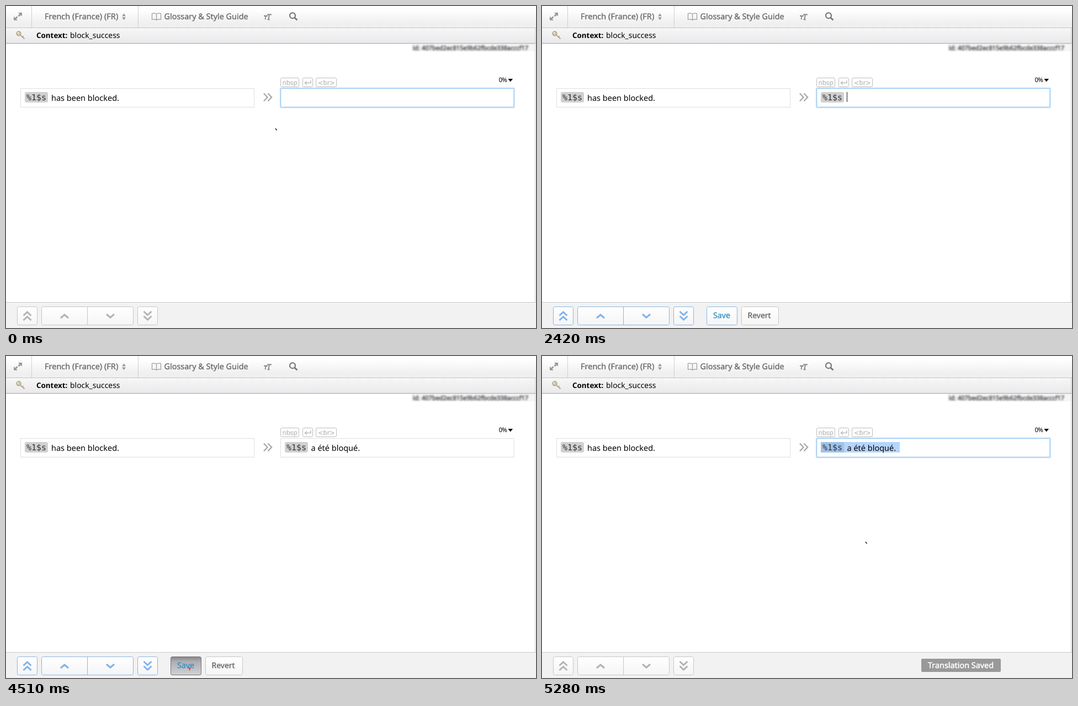
Animation of 960x584 px, one loop 5.5 s. Source, as an HTML page:

```html
<!DOCTYPE html>
<html lang="en">
<head>
<meta charset="utf-8">
<title>Translation editor</title>
<style>
html, body { margin: 0; width: 100%; height: 100%; overflow: hidden; background: #fff; }
svg { display: block; width: 960px; height: 584px; font: 14.5px "Noto Sans", "Open Sans", sans-serif; text-rendering: geometricPrecision; }
/* One tick of 110 ms is 2 % of the loop. */
svg * { animation: none 5.5s step-end infinite; }
.line { fill: none; stroke: #9b9b9b; stroke-width: 2; }
.medium { fill: #666; stroke: #666; stroke-width: .3; }
.mono { font: 15px "DejaVu Sans Mono", monospace; fill: #333; }
.tool { font: 11.3px "DejaVu Sans", sans-serif; fill: #b9b9b9; stroke: #b9b9b9; stroke-width: .25; }
.field { fill: #fff; stroke: #dedede; }
.hash { font-size: 11px; fill: #555; stroke: #555; stroke-width: .6; filter: blur(1.8px); }

.buttons { fill: url(#button); stroke: #c6c6c6; animation-name: borders; }
.chevrons { fill: none; stroke: #b2b2b2; stroke-width: 3; animation-name: chevrons; }
@keyframes borders { 10% { stroke: #8bb5e2; } 90% { stroke: #c6c6c6; } }
@keyframes chevrons { 10% { stroke: #7fb2ec; } 90% { stroke: #b2b2b2; } }

.actions, .chip, .toast, .selection, .pressed, .flash, .click, .beam, .caret { opacity: 0; }
.actions { animation-name: actions; }
.chip { animation-name: chip; }
.toast, .selection { animation-name: saved; }
.pressed { animation-name: pressed; }
.flash { animation-name: flash; }
.focus { animation-name: focus; }
@keyframes actions { 10% { opacity: 1; } 90% { opacity: 0; } }
@keyframes chip { 10% { opacity: 1; } }
@keyframes saved { 90% { opacity: 1; } }
@keyframes pressed { 82% { opacity: 1; } 90% { opacity: 0; } }
@keyframes flash { 84% { opacity: 1; } 88% { opacity: 0; } }
@keyframes focus { 82% { opacity: 0; } 90% { opacity: 1; } }

.typed tspan { fill-opacity: 0; }
.typed tspan:nth-child(1) { animation-name: type1; }
.typed tspan:nth-child(2) { animation-name: type2; }
.typed tspan:nth-child(3) { animation-name: type3; }
@keyframes type1 { 46% { fill-opacity: 1; } }
@keyframes type2 { 48% { fill-opacity: 1; } }
@keyframes type3 { 60% { fill-opacity: 1; } }

.caret { animation-name: blink, advance; }
@keyframes blink {
  34%, 42%, 56%, 64%, 72%, 80% { opacity: 1; }
  38%, 52%, 60%, 68%, 76%, 82% { opacity: 0; }
}
@keyframes advance {
  0% { transform: translateX(552.5px); }
  46% { transform: translateX(587.5px); }
  48% { transform: translateX(637.5px); }
  60% { transform: translateX(645.5px); }
}

.pointer { animation-name: travel; }
.arrow { animation-name: arrow; }
.click { animation-name: click; }
.beam { animation-name: beam; }
@keyframes travel {
  0% { transform: translate(489px, 223px); animation-timing-function: steps(5); }
  10% { transform: translate(53px, 160px); }
  12% { transform: translate(53px, 160px); animation-timing-function: steps(4); }
  20% { transform: translate(519px, 160px); }
  64% { transform: translate(520px, 200px); animation-timing-function: steps(2); }
  68% { transform: translate(335px, 562px); }
  76% { transform: translate(332px, 567px); }
  88% { transform: translate(332px, 567px); animation-timing-function: steps(4); }
  96%, 100% { transform: translate(587px, 338px); }
}
@keyframes arrow { 0%, 14%, 66%, 88% { opacity: 1; } 10%, 20%, 82% { opacity: 0; } }
@keyframes click { 10%, 82% { opacity: 1; } 14%, 88% { opacity: 0; } }
@keyframes beam { 20% { opacity: .7; } 26% { opacity: 0; } }
</style>
</head>
<body>
<svg viewBox="0 0 960 584">
  <defs>
    <linearGradient id="header" x2="0" y2="1"><stop offset=".2" stop-color="#fefefe"/><stop offset=".75" stop-color="#f0f0f0"/><stop offset="1" stop-color="#efefef"/></linearGradient>
    <linearGradient id="context" x2="0" y2="1"><stop stop-color="#f7f7f8"/><stop offset="1" stop-color="#e9e9eb"/></linearGradient>
    <linearGradient id="button" x2="0" y2="1"><stop stop-color="#fff"/><stop offset="1" stop-color="#f5f5f5"/></linearGradient>
    <linearGradient id="press" x2="0" y2="1"><stop stop-color="#858589"/><stop offset=".25" stop-color="#adadb1"/><stop offset="1" stop-color="#d2d2d5"/></linearGradient>
    <g id="tag">
      <rect y="156" width="42" height="19" rx="3" fill="#d0d0d0"/>
      <text class="mono" x="3" y="171">%1$s</text>
    </g>
  </defs>
  <rect width="960" height="584" fill="#fff"/>

  <!-- header -->
  <rect width="960" height="40" fill="url(#header)"/>
  <path d="M46.5 0V39M239.5 0V39" stroke="#cfcfcf"/>
  <path d="M0 39.5H960" stroke="#c4c4c4"/>
  <g fill="#999">
    <path d="M22 12h7v7l-2.500-2.500-3 3-2-2 3-3zM14 19v7h7l-2.500-2.500 3-3-2-2-3 3z"/>
    <path d="M210 18.500l3.500-5 3.500 5zM210 20.500l3.500 5 3.500-5z"/>
  </g>
  <path class="line" style="stroke-width:1.200" d="M272.500 14.500C270 12.500 267 13 264.500 13.500V24.500C267 24 270 24 272.500 25.500 275 24 278 24 280.500 24.500V13.500C278 13 275 12.500 272.500 14.500V25.500"/>
  <g class="medium">
    <text x="70" y="24">French (France) (FR)</text>
    <text x="286.500" y="24" font-size="14.400">Glossary &amp; Style Guide</text>
  </g>
  <g fill="none" stroke="#888" stroke-width="1.800">
    <path d="M467 18H474M470.500 18L469.500 24.500M473 15.500H481M477 15.500L475.500 24.500M473.500 24.500H477.500"/>
    <path d="M522.500 21L527.500 25.500" stroke="#777" stroke-width="3"/>
    <circle cx="519" cy="17.300" r="5" stroke="#777" stroke-width="2.200"/>
  </g>

  <!-- context bar -->
  <rect y="40" width="960" height="27" fill="url(#context)"/>
  <path d="M0 67.500H960" stroke="#bdbdbd"/>
  <path d="M0 68.500H960" stroke="#d6d6d6"/>
  <path d="M958.500 40V537" stroke="#cfcfcf"/>
  <g fill="none" stroke="#b3aa8d">
    <path d="M26 53L33.500 59.500M29.500 56.500L31.500 54.500" stroke-width="2"/>
    <circle cx="23" cy="50" r="3.700" fill="#d8d0b2" stroke-width="2"/>
    <circle cx="21.500" cy="48.500" r="1" fill="#fff" stroke="none"/>
  </g>
  <text x="55" y="58" font-size="13.400" font-weight="700">Context:</text>
  <text x="116" y="58" font-size="13.900">block_success</text>
  <rect x="735" y="69" width="223" height="13" fill="#f5f5f5"/>
  <g class="hash"><text x="737" y="80">id:</text><text x="753" y="80">407bed2ec815e9b62fbcde338acccf17</text></g>

  <!-- editor -->
  <g fill="none" stroke="#bcbcbc">
    <rect x="497.500" y="130.500" width="33" height="16" rx="2"/>
    <rect x="537.500" y="130.500" width="18" height="16" rx="2"/>
    <rect x="561.500" y="130.500" width="37" height="16" rx="2"/>
    <path d="M552 135V139.500H542M545 136.500L541.500 139.500 545 142.500" stroke-width="1.500"/>
  </g>
  <g class="tool"><text x="500.500" y="143">nbsp</text><text x="565" y="143">&lt;br&gt;</text></g>
  <text x="892.500" y="138" font-size="11.500" letter-spacing="-.9">0%</text>
  <path d="M909.500 132H918L913.700 137.500z"/>

  <rect class="field" x="26.500" y="149.500" width="423" height="34"/>
  <use href="#tag" x="34"/>
  <text x="82" y="172">has been blocked.</text>
  <path class="line" style="stroke:#aaa;stroke-width:2.400" d="M467 158.500L473.500 165.500 467 172.500M474.500 158.500L481 165.500 474.500 172.500"/>

  <rect class="field" x="497.500" y="149.500" width="422.500" height="34"/>
  <path class="flash" d="M505 177H911V198.500H531V194H505z" fill="#fff9f1"/>
  <g class="focus" fill="none">
    <rect x="497" y="149" width="423.500" height="35" rx="1.500" stroke="#d5e9fb" stroke-width="3"/>
    <rect x="497.500" y="149.500" width="422.500" height="34" rx="1" stroke="#93c5ef"/>
  </g>
  <g class="chip"><use href="#tag" x="505"/></g>
  <g class="selection">
    <rect x="505" y="156" width="42" height="19" fill="#9fc1ea"/>
    <rect x="547" y="156" width="101" height="19" fill="#b5d5fd"/>
    <text class="mono" x="508" y="171">%1$s</text>
  </g>
  <text class="typed" x="552.500" y="172"><tspan>a été</tspan><tspan> bloqué</tspan><tspan>.</tspan></text>
  <path class="caret" d="M0 156V174" stroke="#222" stroke-width="1.200"/>

  <!-- footer -->
  <rect y="537" width="960" height="47" fill="#f2f2f2"/>
  <path d="M0 537.500H960" stroke="#c9c9c9"/>
  <g class="buttons">
    <rect x="20.500" y="545.500" width="36" height="33" rx="3"/>
    <rect x="64.500" y="545.500" width="166" height="33" rx="3"/>
    <path d="M147.500 546V578"/>
    <rect x="238.500" y="545.500" width="36" height="33" rx="3"/>
  </g>
  <path class="chevrons" d="M31.500 561.500L38.500 555 45.500 561.500M31.500 570L38.500 563.500 45.500 570M99 566L106 560 113 566M182 559L189 565 196 559M249.500 554L256.500 560.500 263.500 554M249.500 562.500L256.500 569 263.500 562.500"/>
  <g class="actions">
    <rect x="298.500" y="545.500" width="55" height="33" rx="3" fill="url(#button)" stroke="#8bb5e2"/>
    <rect x="361.500" y="545.500" width="67" height="33" rx="3" fill="url(#button)" stroke="#c6c6c6"/>
    <rect class="pressed" x="298.500" y="545.500" width="55" height="33" rx="3" fill="url(#press)" stroke="#77777b"/>
    <text x="310" y="566" font-size="14.200" fill="#2f8fc2" stroke="#2f8fc2" stroke-width=".3">Save</text>
    <text class="medium" x="372.500" y="566" font-size="14">Revert</text>
  </g>
  <g class="toast">
    <rect x="687" y="549" width="144" height="24" rx="2" fill="#999"/>
    <text x="699" y="566" font-size="14.400" fill="#fff" stroke="#fff" stroke-width=".5">Translation Saved</text>
  </g>

  <g class="pointer">
    <path class="arrow" d="M-1 -2L2 1.500 1 3 0 1.500-1 1z" fill="#222"/>
    <path class="click" d="M-2.500 0L0-3 3 0 1 1 2 3.500 0 3-.5 0z" fill="#bd4c50"/>
    <path class="beam" d="M-2-3H2M0-3V3" stroke="#fff" fill="none"/>
  </g>
</svg>
</body>
</html>
```
